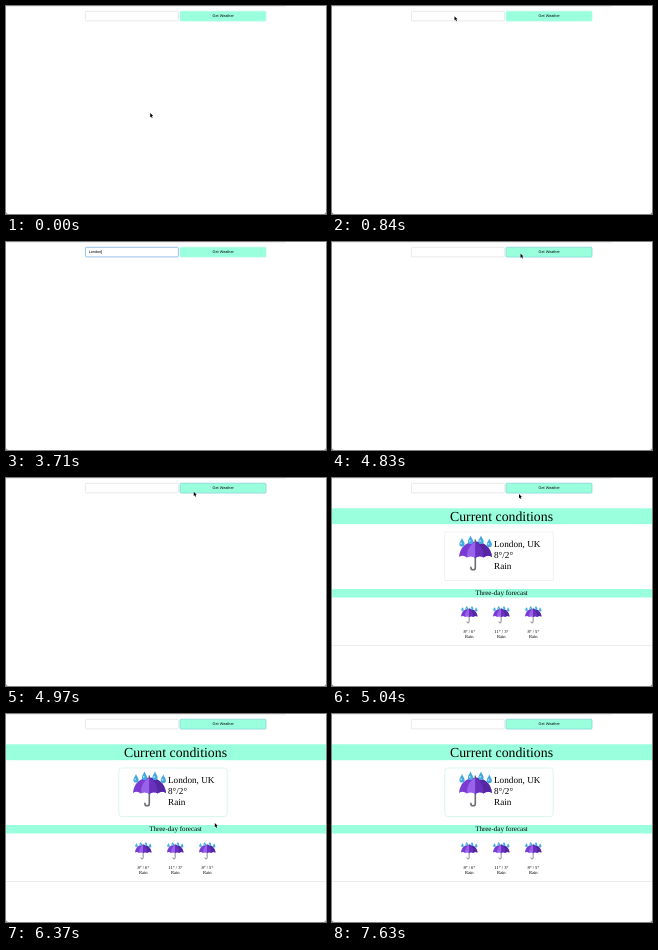
An HTML page that plays this animation: 320x208 px, repeating every 7910 ms.

```html
<!DOCTYPE html>
<html lang="en">
<head>
<meta charset="utf-8">
<title>Weather search</title>
<style>
  html, body { margin: 0; width: 100%; height: 100%; overflow: hidden; background: #fff; }
  svg { display: block; width: 100%; height: 100%; }
  text { text-rendering: geometricPrecision; fill: #000; font-family: "Liberation Serif", Times, serif; }
  .ui { font-family: "Liberation Sans", Arial, sans-serif; font-size: 3.75px; }
  .mid { text-anchor: middle; }
  .now { font-size: 9.2px; }
  .day { font-size: 4.6px; }
  .band { fill: #99ffdd; }
</style>
</head>
<body>
<svg viewBox="0 0 320 208">
  <defs>
    <path id="drop" d="M0-4.6C1 -2 2.6-.6 2.6 1.4A2.6 2.6 0 0 1-2.6 1.4C-2.6-.6-1-2 0-4.6Z"/>
    <g id="umbrella">
      <path d="M17.3 17V32.4q0 2.4-2.2 2.4t-2.2-2.4" fill="none" stroke="#6c6c74" stroke-width="1.6" stroke-linecap="round"/>
      <path d="M1 22C2 12 8 7 17.3 6.5C26 7 33 12 34 22Q29.5 19 25.5 22.6Q21.5 19.500 17.3 23Q13 19.500 9 22.6Q5 19 1 22Z" fill="#7a3bd2"/>
      <path d="M17.3 6.500C10.500 11 9 16 9 22.600Q13 19.500 17.300 23Z" fill="#9a62ea"/>
      <path d="M17.3 6.500C24 11 25.500 16 25.500 22.600Q21.500 19.500 17.300 23Z" fill="#6830bd"/>
      <path d="M17.300 6.500C26 7 33 12 34 22Q29.500 19 25.500 22.600C25.500 16 24 11 17.300 6.500Z" fill="#5527a3"/>
      <path d="M17.300 4.500V7" stroke="#55555c" stroke-width="1.200"/>
      <g fill="#45a9df">
        <use href="#drop" x="4" y="7.500"/>
        <use href="#drop" x="12.500" y="5"/>
        <use href="#drop" x="23" y="5"/>
        <use href="#drop" x="31.300" y="8"/>
      </g>
      <g fill="#b5e4f8">
        <circle cx="3.200" cy="8.300" r=".9"/>
        <circle cx="11.700" cy="5.800" r=".9"/>
        <circle cx="22.200" cy="5.800" r=".9"/>
        <circle cx="30.500" cy="8.800" r=".9"/>
      </g>
    </g>
  </defs>

  <path d="M0 .3H280" stroke="#dcdcdc" stroke-width=".6"/>
  <path d="M0 205.500V208H2.500Q0 208 0 205.500ZM320 205.500V208H317.500Q320 208 320 205.500Z" fill="#777"/>

  <rect id="field" x="79.400" y="5.300" width="93" height="9.600" rx="1" fill="#fff" stroke-width=".8"/>
  <text id="typed" class="ui" x="82.700" y="11.300"></text>
  <path id="caret" d="M0 7.900V12" stroke="#222" stroke-width=".5"/>
  <rect id="button" x="174" y="5.200" width="86" height="9.900" rx="1" fill="#99ffdd" stroke-width=".7"/>
  <text class="ui mid" x="217.200" y="11.300">Get Weather</text>

  <g id="report">
    <rect class="band" y="30.300" width="320" height="15.900"/>
    <text class="mid" x="169.500" y="43" font-size="13.800">Current conditions</text>
    <rect id="card" x="112.800" y="54" width="108.400" height="48.500" fill="none" stroke-width=".6"/>
    <use href="#umbrella" x="126" y="57"/>
    <text class="now" x="162" y="69.400">London, UK</text>
    <text class="now" x="162" y="80">8°/2°</text>
    <text class="now" x="162" y="90.600">Rain</text>
    <rect class="band" y="111" width="320" height="8.500"/>
    <text class="mid" x="169.500" y="117.300" font-size="7">Three-day forecast</text>
    <g id="days"></g>
    <path d="M0 167.500H320" stroke="#e4e4e4" stroke-width=".7"/>
  </g>

  <path id="arrow" d="M0 0V4.300L1 3.400L1.700 5L2.400 4.700L1.700 3.100H3Z" stroke="#fff" stroke-width=".7" paint-order="stroke"/>
  <path id="beam" d="M-.8-2.200Q0-2.200 0-1.600V1.600Q0 2.200-.8 2.200M.8-2.200Q0-2.200 0-1.600V1.600Q0 2.200 .8 2.200" fill="none" stroke="#333" stroke-width=".45"/>
</svg>
<script>
  const LOOP = 7910, STEP = 70, CLICK = 4830, LOADED = 5040;
  const $ = id => document.getElementById(id);
  const show = (id, on) => $(id).setAttribute('visibility', on ? 'visible' : 'hidden');
  const set = (id, name, value) => $(id).setAttribute(name, value);

  $('days').innerHTML = ['8° / 6°', '11° / 3°', '8° / 5°'].map((temps, i) => {
    const x = 137.300 + 32 * i;
    return `<use href="#umbrella" transform="translate(${x - 8.8} 127.600) scale(.5)"/>
      <text class="day mid" x="${x}" y="154.600">${temps}</text>
      <text class="day mid" x="${x}" y="159.700">Rain</text>`;
  }).join('');

  const keyTimes = [2940, 3220, 3360, 3500, 3570, 3710];

  // Pointer stops: time, x, y
  const stops = [
    [0, 144.2, 107], [140, 139.5, 38], [280, 139.5, 38], [700, 117.5, 4.5], [770, 117.5, 4.5],
    [840, 122.5, 10.2], [4060, 122.5, 10.2], [4760, 188.5, 11.5], [4900, 188.5, 11.5],
    [5040, 187, 16], [6160, 187, 16], [6370, 208.8, 109], [6930, 209.5, 109.5], [7490, 229, 178]
  ];

  function pointer(t) {
    const i = Math.max(1, stops.findIndex(s => s[0] >= t));
    const [t0, x0, y0] = stops[i - 1], [t1, x1, y1] = stops[i];
    const p = (t - t0) / (t1 - t0), k = p * p * (3 - 2 * p);
    return [x0 + (x1 - x0) * k, y0 + (y1 - y0) * k];
  }

  function draw(t) {
    const focus = t >= 1540 && t < CLICK;
    const count = focus ? keyTimes.filter(k => t >= k).length : 0;
    $('typed').textContent = 'London'.slice(0, count);
    set('field', 'stroke', focus ? '#7fb0de' : '#e2e2e2');
    set('caret', 'transform', `translate(${82.9 + 2.08 * count})`);
    const blink = (t >= 2100 && t < 2590) || (t >= 4200 && t < 4690);
    show('caret', focus && !blink);
    set('button', 'stroke', t >= CLICK ? '#83cfd6' : '#b4fbe4');

    show('report', t >= LOADED);
    const settled = t >= LOADED + STEP;
    set('card', 'stroke', settled ? '#c2f0e2' : '#e6e6e6');
    set('card', 'rx', settled ? 3 : 0);

    const hidden = (t >= 2940 && t < 4130) || t >= 7490;
    const [x, y] = hidden ? [0, 0] : pointer(t);
    const beam = t >= 1680 && t < CLICK && x < 172;
    show('arrow', !hidden && !beam);
    show('beam', !hidden && beam);
    set('arrow', 'transform', `translate(${x} ${y})`);
    set('beam', 'transform', `translate(${x} ${y})`);
  }

  function tick() {
    const t = performance.now() % LOOP;
    draw(Math.floor(t / STEP) * STEP);
    requestAnimationFrame(tick);
  }
  tick();
</script>
</body>
</html>
```
